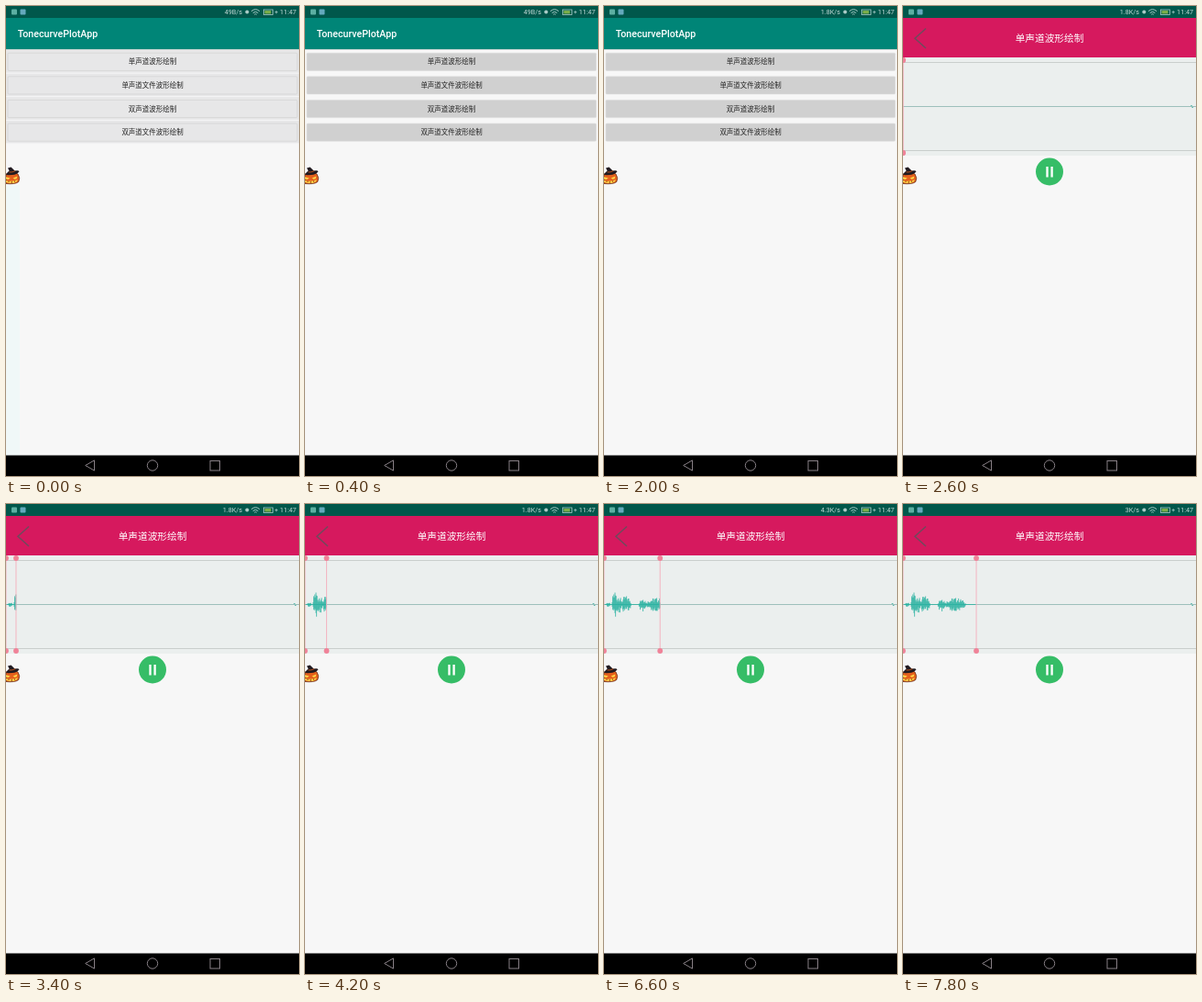
Animation, 320 px wide and 512 px high, one loop 8000 ms. Source, as an HTML page:

```html
<!DOCTYPE html>
<html lang="zh-CN">
<head>
<meta charset="utf-8">
<title>Waveform recorder</title>
<style>
  html, body { margin: 0; width: 100%; height: 100%; overflow: hidden; background: #f7f7f7; }
  svg { display: block; width: 320px; height: 512px; }
  text { font-family: Roboto, "Noto Sans CJK SC", "Noto Sans CJK", sans-serif; }
  .status { font-size: 7.2px; fill: #c3d8d5; }
  .label { font-size: 7.47px; font-weight: 500; fill: #222; text-anchor: middle; }
  .title { font-size: 10.67px; font-weight: 500; fill: #fff; }
  .box { fill: #d0d0d0; stroke: #dcdcdc; stroke-width: .6; }
  .idle { fill: none; }
  .fresh .idle { fill: #e7e7e8; }
  .fresh .box { fill: #e7e7e8; stroke: #cfcfcf; }
  #strip { fill: none; }
  .fresh #strip { fill: #f0f8f8; }
</style>
</head>
<body>
<svg viewBox="0 0 320 512">
  <rect width="320" height="512" fill="#f7f7f7"/>

  <g id="menu">
    <rect id="strip" y="195" width="15" height="295"/>
    <rect y="13" width="320" height="34" fill="#008577"/>
    <rect y="47" width="320" height="1" fill="#c9d6d4"/>
    <text class="title" x="12.8" y="34.4">TonecurvePlotApp</text>
    <g id="buttons"></g>
  </g>

  <g id="recorder">
    <rect y="13" width="320" height="43" fill="#d6195e"/>
    <path d="M25 24.5 13 35.2 25 46" fill="none" stroke="#704a5c" stroke-width="1.5"/>
    <text class="title" x="160" y="39" text-anchor="middle">单声道波形绘制</text>
    <rect y="56" width="320" height="107" fill="#ebefee"/>
    <path d="M0 61.5H320M0 157.5H320" stroke="#c9cecc"/>
    <path d="M0 109.5H320" stroke="#9dbfbb"/>
    <path d="M314.3 108.5h1.4M315.5 110.5h1.4" stroke="#48b5a5"/>
    <path id="wave" fill="none" stroke="#2db3a1" stroke-width=".8"/>
    <g id="start"></g>
    <g id="head"></g>
    <circle cx="160" cy="180.5" r="15" fill="#36bd67"/>
    <path d="M157.5 175v11.4M162.6 175v11.4" stroke="#fff" stroke-width="2.3"/>
  </g>

  <g id="pumpkin">
    <path d="M0 183Q7 179.5 13 183 16 187.5 13.8 191.5 10 194.5 0 193.5z" fill="#e5601c" stroke="#5a2410" stroke-width=".7"/>
    <path d="M0 186.2 4.8 187.6 2.4 189 0 188.6zM7.6 187.6 12.4 185.6 11.6 188.2 9.4 188.8z" fill="#ffd84a"/>
    <path d="M0 190.2Q7 191.8 13 189.2 11.5 193 6.5 193 2 193 0 191.8z" fill="#ffd84a"/>
    <path d="M3 190.6v1.4M6.2 191v2M9.6 190.4v1.4" stroke="#8c2c0c" stroke-width=".9"/>
    <path d="M0 183.8Q1.6 181 3.6 179.6L2 176.5 5.5 175.4 9.6 179.6Q13.6 178.6 14.5 180.2 12 183.6 6.5 184T0 183.8z" fill="#211a20"/>
    <path d="M3.6 181q3.4.4 6.6-1.4" fill="none" stroke="#b5531f"/>
  </g>

  <rect width="320" height="13" fill="#00574b"/>
  <rect x="6" y="3.5" width="6" height="6" rx="1" fill="#5cafa2"/>
  <rect x="15.5" y="3.5" width="6" height="6" rx="1" fill="#63a9bd"/>
  <text class="status" id="speed" x="258" y="9.3" text-anchor="end"></text>
  <circle cx="263.3" cy="6.6" r="2" fill="#a9cbc6"/>
  <g fill="none" stroke="#a9cbc6">
    <path d="M268 5.7q4.5-4 9 0M269.7 7.5q2.8-2.4 5.6 0M271.3 9.2q1.2-1 2.4 0"/>
    <rect x="281.5" y="4" width="10" height="5.4" stroke-width=".8"/>
    <path d="M293.6 6.7h3.2M295.2 5.1v3.2" stroke-width=".8"/>
  </g>
  <rect x="282.5" y="5" width="7" height="3.5" fill="#79ad49"/>
  <text class="status" x="317" y="9.3" text-anchor="end">11:47</text>

  <rect y="489.5" width="320" height="22.5"/>
  <g fill="none" stroke="#888086">
    <path d="M86.7 500.5 96.5 494.9v11.2z"/>
    <circle cx="160" cy="500.5" r="5.7"/>
    <rect x="223" y="495.5" width="10.5" height="10.5"/>
  </g>
</svg>
<script>
const LOOP = 8000, STEP = 200;
const OPEN = 2400;                 // recorder screen appears
const REC = 2700, RATE = 0.0157;   // recording start, px per ms
const MID = 109.5;
const LABELS = ['单声道波形绘制', '单声道文件波形绘制', '双声道波形绘制', '双声道文件波形绘制'];
const SPEEDS = [[0, '49B/s'], [1800, '1.8K/s'], [4800, '4.3K/s'], [7800, '3K/s']];
// Sound bursts: start x, end x, peak height
const BURSTS = [[2, 7, 2.5], [8.8, 14.5, 16], [13, 19, 11], [18, 30, 9.5], [38, 46.5, 8], [45, 69, 7.5]];

const $ = id => document.getElementById(id);
const show = (id, on) => { $(id).style.display = on ? '' : 'none'; };

$('buttons').innerHTML = LABELS.map((label, i) => {
  const y = 48 + i * 25.6;
  return `<rect class="idle" y="${y}" width="320" height="24.6"/>
    <rect class="box" x="2" y="${y + 3.2}" width="316" height="19.2" rx="1"/>
    <text class="label" x="160" y="${y + 15.4}">${label}</text>`;
}).join('');

const marker = `<path d="M0 59V160" stroke="#f5aebb" stroke-width=".9"/>
  <circle cy="59" r="2.9" fill="#f08399"/><circle cy="160" r="2.9" fill="#f08399"/>`;
$('start').innerHTML = $('head').innerHTML = marker;

function noise(n) {
  const v = Math.sin(n * 12.9898) * 43758.5453;
  return v - Math.floor(v);
}

function level(x) {
  let h = 0;
  for (const [a, b, peak] of BURSTS) {
    if (x > a && x < b) h = Math.max(h, peak * Math.sin(Math.PI * (x - a) / (b - a)) ** 0.6);
  }
  return h;
}

function wavePath(end) {
  let d = `M0 ${MID}H${end}`;
  for (let i = 0; i * 0.6 < end; i++) {
    const x = i * 0.6, h = level(x);
    if (!h) continue;
    const up = h * (0.25 + 0.75 * noise(i)), down = h * (0.25 + 0.75 * noise(i + 500));
    d += `M${x.toFixed(1)} ${(MID - up).toFixed(1)}V${(MID + down).toFixed(1)}`;
  }
  return d;
}

function draw(t) {
  show('menu', t < OPEN);
  show('recorder', t >= OPEN);
  $('menu').classList.toggle('fresh', t < STEP);
  $('speed').textContent = SPEEDS.filter(s => s[0] <= t).pop()[1];
  const x = Math.max(0, (t - REC) * RATE);
  $('head').setAttribute('transform', `translate(${x.toFixed(2)} 0)`);
  $('wave').setAttribute('d', wavePath(x));
}

let last = -1;
function tick(now) {
  const t = Math.floor((now % LOOP) / STEP) * STEP;
  if (t !== last) draw(last = t);
  requestAnimationFrame(tick);
}
tick(performance.now());
</script>
</body>
</html>
```
